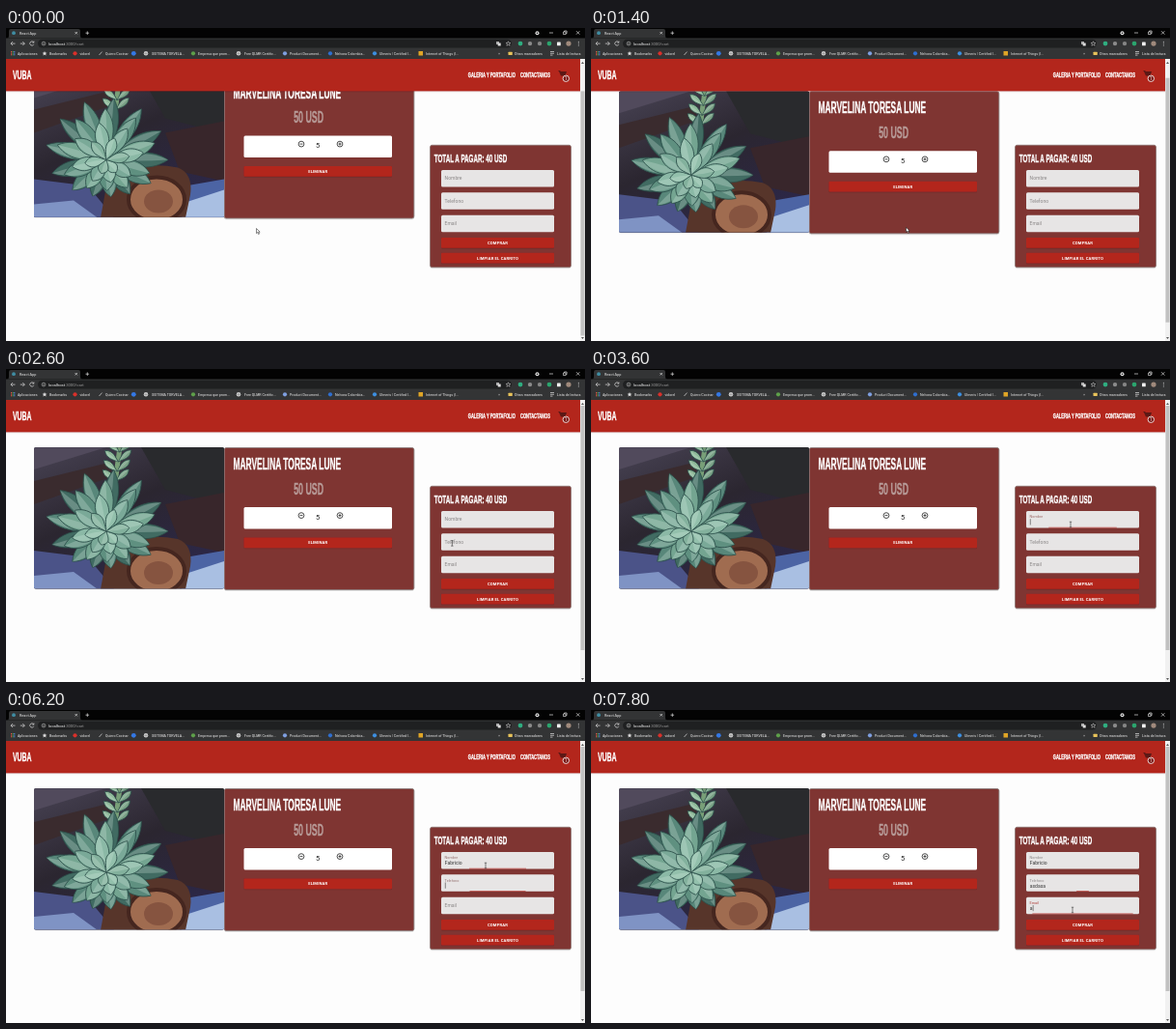
Animation, 600 px wide and 324 px high, one loop 8000 ms. Source, as an HTML page:

```html
<!DOCTYPE html>
<html lang="es">
<head>
<meta charset="utf-8">
<title>React App</title>
<style>
  html, body { margin: 0; width: 100%; height: 100%; overflow: hidden; background: #fdfdfd; }
  svg { display: block; width: 100vw; height: 100vh; }
  text { font-family: Roboto, sans-serif; white-space: pre; }
  .caps { font-family: "Liberation Sans", Arial, sans-serif; font-weight: 700; stroke-width: .4; }
  .btn { font-size: 4.2px; font-weight: 700; letter-spacing: .12px; fill: #fff; text-anchor: middle; }
  .line { fill: none; stroke: #ddd; stroke-width: .7; }
</style>
</head>
<body>
<svg id="stage" viewBox="0 0 600 324" preserveAspectRatio="none"></svg>
<script>
const LOOP = 8000, STEP = 200, SCROLL = 31.5;
const RED = '#b3251e', CARD = '#7f3430', BAR = '#333435';

// ---------- drawing helpers ----------
const rect = (x, y, w, h, fill, more = '') =>
  `<rect x="${x}" y="${y}" width="${w}" height="${h}" fill="${fill}" ${more}/>`;
const dot = (x, y, r, fill, more = '') => `<circle cx="${x}" cy="${y}" r="${r}" fill="${fill}" ${more}/>`;
const line = (d, more = '') => `<path class="line" d="${d}" ${more}/>`;
const label = (x, y, size, fill, str, more = '') =>
  `<text x="${x}" y="${y}" font-size="${size}" fill="${fill}" ${more}>${str}</text>`;
// Tall narrow capitals: one fixed proportion for every heading
const caps = (x, y, size, fill, str) =>
  `<text class="caps" transform="translate(${x} ${y}) scale(.54 1)" font-size="${size}" fill="${fill}" stroke="${fill}">${str}</text>`;
const button = (x, y, w, str) =>
  rect(x, y, w, 10.8, RED, 'rx="1" filter="url(#soft)"') +
  `<text class="btn" x="${x + w / 2}" y="${y + 6.9}">${str}</text>`;
const globe = (x, y) => dot(x, y, 2.2, '#ddd') +
  line(`M${x - 2} ${y}h4M${x} ${y - 2}v4`, 'style="stroke:#555;stroke-width:.4"');

// ---------- succulent picture ----------
// Spoon-shaped leaf with a lit upper half
const leaf = (x, y, len, wide, deg, fill) => {
  const side = w => `C${len * .3} ${w * .4} ${len * .65} ${w * 1.5} ${len} 0`;
  return `<g transform="translate(${x} ${y}) rotate(${deg})">
    <path d="M0 0${side(-wide)}C${len * .65} ${wide * 1.5} ${len * .3} ${wide * .4} 0 0" fill="${fill}" stroke="#2c4f4a" stroke-width=".8"/>
    <path d="M0 0${side(-wide * .8)}Q${len * .5} ${wide * .2} 0 0" fill="#cfe6da" opacity=".28"/></g>`;
};

function rosette(x, y) {
  const rings = [
    [13, 64, 10, ['#416b62', '#58877a']],
    [10, 53, 10, ['#5f9080', '#74a591']],
    [8, 39, 9, ['#7aa998', '#8bb9a6']],
    [6, 24, 7, ['#93c0ac', '#83b19d']]
  ];
  let out = '';
  rings.forEach(([count, len, wide, tones], r) => {
    for (let i = 0; i < count; i++) {
      const deg = i * 360 / count + r * 17;
      const low = Math.max(0, Math.sin(deg * Math.PI / 180));
      out += leaf(x, y, len * (1 - .4 * low), wide, deg, tones[i % 2]);
    }
  });
  return out;
}

function stalk() {
  let out = '<path d="M110 165Q112 120 118 81" fill="none" stroke="#789f78" stroke-width="5"/>';
  for (let i = 0; i < 4; i++) {
    const x = 114 + i * 1.2, y = 116 - i * 10;
    out += leaf(x, y, 18, 4, -140, '#8fb999') + leaf(x, y, 18, 4, -42, '#789f84');
  }
  return out;
}

const photo = `<g clip-path="url(#photoBox)">
  ${rect(29, 81, 197, 147, 'url(#dusk)')}
  <path d="M29 81h75L29 104z" fill="#514a5c"/>
  <path d="M29 116L110 96L108 112L29 140z" fill="#3a2b2e"/>
  <path d="M140 81h86v60L165 125z" fill="#292a2d"/>
  <path d="M165 140L226 128V190L180 180z" fill="#38262b"/>
  <path d="M29 188L85 195L112 228H29z" fill="#4b5388"/>
  <path d="M29 214L70 210L95 228H29z" fill="#7f93c4"/>
  <path d="M180 196L226 188V228H180z" fill="#4c64a4"/>
  <path d="M186 212L226 199V228H182z" fill="#a9bfe2"/>
  <path d="M98 228L105 190Q135 168 178 176Q194 182 191 204L186 228z" fill="#57352a"/>
  <ellipse cx="156" cy="209" rx="29" ry="23" fill="#a06c50" stroke="#45261f" stroke-width="4"/>
  <ellipse cx="158" cy="211" rx="15" ry="12" fill="#865440"/>
  ${stalk()}${rosette(104, 168)}
</g>`;

// ---------- page ----------
const product = `
  ${rect(29, 81.3, 197, 146, '#222', 'rx="2" filter="url(#soft)"')}
  ${rect(226.2, 81.5, 196.6, 147, CARD, 'rx="2" stroke="#8d7f7e" stroke-width=".8" filter="url(#soft)"')}
  ${photo}
  ${caps(235.5, 104.2, 15.6, '#fff', 'MARVELINA TORESA LUNE')}
  ${caps(298.2, 129.9, 16.4, '#b79a97', '50 USD')}
  ${rect(246.5, 143, 153.5, 22.6, '#fff', 'rx="1.5"')}
  <g fill="none" stroke="#222" stroke-width=".8">
    <circle cx="306" cy="151.6" r="2.9"/><circle cx="346" cy="151.6" r="2.9"/>
    <path d="M304.5 151.6h3M344.5 151.6h3M346 150.1v3"/>
  </g>
  ${label(321, 155.8, 7.4, '#222', '5')}
  ${button(246.5, 174.4, 153.5, 'ELIMINAR')}`;

const FIELDS = [
  { name: 'Nombre', y: 147, text: 'Fabricio', focus: 3526, blur: 6142, type: 5000, pace: 130 },
  { name: 'Telefono', y: 170.3, text: 'asdasa', focus: 6142, blur: 7666, type: 6500, pace: 130 },
  { name: 'Email', y: 193.8, text: 'a', focus: 7666, blur: LOOP + 1, type: 7800, pace: 200 }
];

const fieldMarkup = (f, i) => `
  ${rect(451, f.y, 117, 17.4, '#e7e5e5', 'rx="1.5"')}
  <rect id="bar${i}" y="${f.y + 16.8}" height=".6" fill="${RED}"/>
  <text id="name${i}" x="454.6">${f.name}</text>
  <text id="value${i}" x="454.8" y="${f.y + 13.3}" font-size="5" fill="#333"></text>
  <rect id="caret${i}" y="${f.y + 8.2}" width=".5" height="6.2" fill="#222"/>`;

const checkout = `
  ${rect(439.5, 121.3, 146, 126.4, CARD, 'rx="2" stroke="#8d7775" stroke-width=".7" filter="url(#soft)"')}
  ${caps(443.7, 139.3, 11.6, '#fff', 'TOTAL A PAGAR: 40 USD')}
  ${FIELDS.map(fieldMarkup).join('')}
  ${button(451, 217, 117, 'COMPRAR')}
  ${button(451, 232.8, 117, 'LIMPIAR EL CARRITO')}`;

const header = `
  ${rect(0, 32, 595, 33.3, RED, 'filter="url(#soft)"')}
  ${caps(7, 52.6, 12.8, '#fff', 'VUBA')}
  ${caps(478.8, 51, 7.5, '#fff', 'GALERIA Y PORTAFOLIO')}
  ${caps(533, 51, 7.5, '#fff', 'CONTACTANOS')}
  <path d="M572 44h2l1 1h6l-1.5 4.5h-4.5l-2-4.5z" fill="#5c1815"/>
  ${dot(580.3, 52.3, 3.2, '#7c1916', 'stroke="#fff" stroke-width=".8"')}
  ${label(580.3, 54, 4.6, '#fff', '1', 'text-anchor="middle"')}`;

const scrollbar = `
  ${rect(595, 32, 5, 292, '#f1f1f1')}
  <rect id="thumb" x="595.5" y="38" width="4" height="253" fill="#c1c1c1"/>
  <path d="M596 37l1.5-2 1.5 2zM596 320l1.5 2 1.5-2z" fill="#555"/>`;

// ---------- browser frame ----------
const BOOKMARKS = [
  [12, 'Aplicaciones'], [45, 'Bookmarks'], [76.5, 'vidorel', '#d9302a'], [103, 'Quiero Cocinar'],
  [151, 'SISTEMA TORVELA...', 'globe'], [199, 'Empresa que prom...', '#5ea04a'],
  [247, 'Free QLMR Certific...', 'globe'], [294, 'Product Document...', '#7f9fe0'],
  [341, 'Nelvora Colombia...', '#2f6fd0'], [387, 'Ulmeris | Certified I...', '#3d8fe0'],
  [435, 'Internet of Things (I...', 'square'], [527, 'Otros marcadores'], [571, 'Lista de lectura']
];

function bookmark([x, str, icon]) {
  const ix = x - 5;
  let mark = '';
  if (icon === 'globe') mark = globe(ix - 1, 26.3);
  else if (icon === 'square') mark = rect(ix - 2.5, 24, 4.5, 4.5, '#e0a526');
  else if (icon) mark = dot(ix, 26.3, 2.1, icon);
  return mark + label(x, 27.6, 3.6, '#f0f0f0', str);
}

let apps = '';
for (let i = 0; i < 9; i++)
  apps += rect(5 + i % 3 * 1.6, 24 + Math.floor(i / 3) * 1.6, 1.1, 1.1, ['#e25141', '#55a85a', '#4f86e0'][i % 3]);

const star = (x, y, more = 'fill="#ddd"') =>
  `<path d="M${x} ${y - 2.3}l.7 1.6 1.7.1-1.3 1.1.5 1.7-1.6-1-1.6 1 .5-1.7-1.3-1.1 1.7-.1z" ${more}/>`;

const browser = `
  ${rect(0, 0, 600, 32, BAR)}
  ${rect(0, 0, 600, 10.5, '#030303')}
  <path d="M1 10.5Q3 10.5 3 8V3Q3 1 5 1H75Q77 1 77 3V8Q77 10.5 79 10.5z" fill="${BAR}"/>
  ${dot(8, 5.2, 1.9, '#3f8ea3')}
  ${label(14, 6.7, 3.8, '#eee', 'React App')}
  ${line('M71.5 4l2.4 2.4M73.9 4l-2.4 2.4M82.5 5.2h3.6M84.3 3.4v3.6')}
  ${dot(550.5, 5.3, 2, '#ddd')}${dot(550.5, 5.3, .8, '#111')}
  ${line('M563 5h4M577.5 4h2.6v2.6h-2.6zM578.5 4v-1h2.6v2.6h-1M591 3.2l3.4 3.4M594.4 3.2l-3.4 3.4')}
  ${rect(33, 11.8, 491, 8.6, '#1f2021', 'rx="4.3"')}
  ${line('M9.5 16.1h-4.5l2-2M5 16.1l2 2M14.8 16.1h4.5l-2-2M19.3 16.1l-2 2M28.6 14.8a2.1 2.1 0 1 0 .2 2M28.9 13.5v1.6h-1.6')}
  ${dot(39, 16.1, 1.9, 'none', 'stroke="#bbb" stroke-width=".6"')}${line('M39 15.8v1.3M39 14.9v.3')}
  ${label(44, 17.6, 4.2, '#f2f2f2', 'localhost<tspan fill="#999">:3000/cart</tspan>')}
  ${rect(508, 14, 3, 3, '#aaa')}${rect(509.7, 15.5, 3, 3, '#ddd')}
  ${star(520.5, 16.1, 'fill="none" stroke="#ddd" stroke-width=".5"')}
  ${dot(533, 16.1, 2.4, '#2fae80')}${dot(543, 16.1, 2.2, '#8b8b8b')}${dot(553, 16.1, 2.2, '#858585')}
  ${dot(563, 16.1, 2.4, '#2ba56e')}${rect(571, 14.5, 3.8, 3.8, '#eee', 'rx=".6"')}
  ${dot(583, 16.1, 2.6, '#a08a7c')}
  ${dot(593.3, 14.3, .5, '#ddd')}${dot(593.3, 16.1, .5, '#ddd')}${dot(593.3, 17.9, .5, '#ddd')}
  ${apps}${star(40, 26.3)}
  ${line('M96.5 28l3-3.4')}${dot(132.3, 26.3, 2.4, '#3478e5')}
  ${BOOKMARKS.map(bookmark).join('')}
  ${label(510, 27.6, 4.4, '#ddd', '»')}
  ${rect(520.5, 24.7, 4.2, 3.4, '#e8c35a', 'rx=".5"')}
  ${line('M564 24.5h4M564 26.3h4M564 28.1h2.5')}`;

const $ = id => document.getElementById(id);
$('stage').innerHTML = `
  <defs>
    <linearGradient id="dusk" x2=".6" y2="1">
      <stop stop-color="#484354"/><stop offset=".5" stop-color="#2b2630"/><stop offset="1" stop-color="#2c2748"/>
    </linearGradient>
    <clipPath id="photoBox">${rect(29, 81.3, 197, 146, '#000', 'rx="1.5"')}</clipPath>
    <filter id="soft" x="-5%" y="-20%" width="110%" height="150%">
      <feDropShadow dx="0" dy=".4" stdDeviation=".5" flood-opacity=".3"/>
    </filter>
  </defs>
  ${rect(0, 0, 600, 324, '#fdfdfd')}
  <g id="page">${product}</g>
  ${checkout}${header}${scrollbar}${browser}
  <path id="arrow" d="M0 0V5l1.2-1 .9 2 .9-.4-.9-1.9H3.6z" fill="#fff" stroke="#111" stroke-width=".5"/>
  <path id="beam" d="M-1.2-2.8h2.4M0-2.8v5.6M-1.2 2.8h2.4" fill="none" stroke="#333" stroke-width=".6"/>`;

// ---------- motion ----------
const clamp = v => Math.max(0, Math.min(1, v));
const easeOut = v => 1 - (1 - clamp(v)) ** 2;
const mix = (a, b, p) => a + (b - a) * p;

// time, x, y
const POINTER = [
  [0, 259.5, 207.5], [600, 280, 240], [1200, 298, 190.5], [1600, 355, 222],
  [2400, 445, 190], [3000, 497, 161], [7200, 497, 161], [7600, 499, 207], [LOOP, 499, 207]
];

function pointerAt(t) {
  const i = Math.max(1, POINTER.findIndex(k => k[0] >= t));
  const [a, b] = [POINTER[i - 1], POINTER[i]];
  const p = (t - a[0]) / (b[0] - a[0]);
  return [mix(a[1], b[1], p), mix(a[2], b[2], p)];
}

function drawField(f, i, t) {
  const on = easeOut((t - f.focus) / 200) - easeOut((t - f.blur) / 200);
  const typed = t < f.type ? 0 : Math.min(f.text.length, 1 + Math.floor((t - f.type) / f.pace));
  const lift = clamp(easeOut((t - f.focus) / 200) * 2.2);
  const tint = on * on;

  const name = $('name' + i);
  name.setAttribute('y', f.y + mix(10.4, 7.2, lift));
  name.setAttribute('font-size', mix(5, 3.8, lift));
  name.setAttribute('fill', `rgb(${mix(138, 184, tint)},${mix(135, 45, tint)},${mix(135, 40, tint)})`);

  const bar = $('bar' + i);
  bar.setAttribute('x', 509.5 - 58.5 * on);
  bar.setAttribute('width', 117 * on);

  const value = $('value' + i);
  value.textContent = f.text.slice(0, typed);
  const since = t - (typed ? f.type + (typed - 1) * f.pace : f.focus);
  const active = t >= f.focus && t < f.blur;
  const caret = $('caret' + i);
  caret.setAttribute('x', 454.9 + (typed ? value.getComputedTextLength() + .2 : 0));
  caret.setAttribute('visibility', active && since % 1000 < 500 ? 'visible' : 'hidden');
}

function draw(t) {
  const offset = SCROLL * (1 - clamp((t - 1200) / 400));
  $('page').setAttribute('transform', `translate(0 ${-offset})`);
  $('thumb').setAttribute('y', 38 + offset * .87);
  FIELDS.forEach((f, i) => drawField(f, i, t));

  const [x, y] = pointerAt(t);
  const inField = x > 451 && x < 568 && FIELDS.some(f => y > f.y && y < f.y + 17.4);
  for (const id of ['arrow', 'beam']) {
    $(id).setAttribute('transform', `translate(${x} ${y})`);
    $(id).setAttribute('visibility', (id === 'beam') === inField ? 'visible' : 'hidden');
  }
}

const start = performance.now();
function tick() {
  const t = (performance.now() - start) % LOOP;
  draw(Math.floor(t / STEP) * STEP);
  requestAnimationFrame(tick);
}
tick();
</script>
</body>
</html>
```
